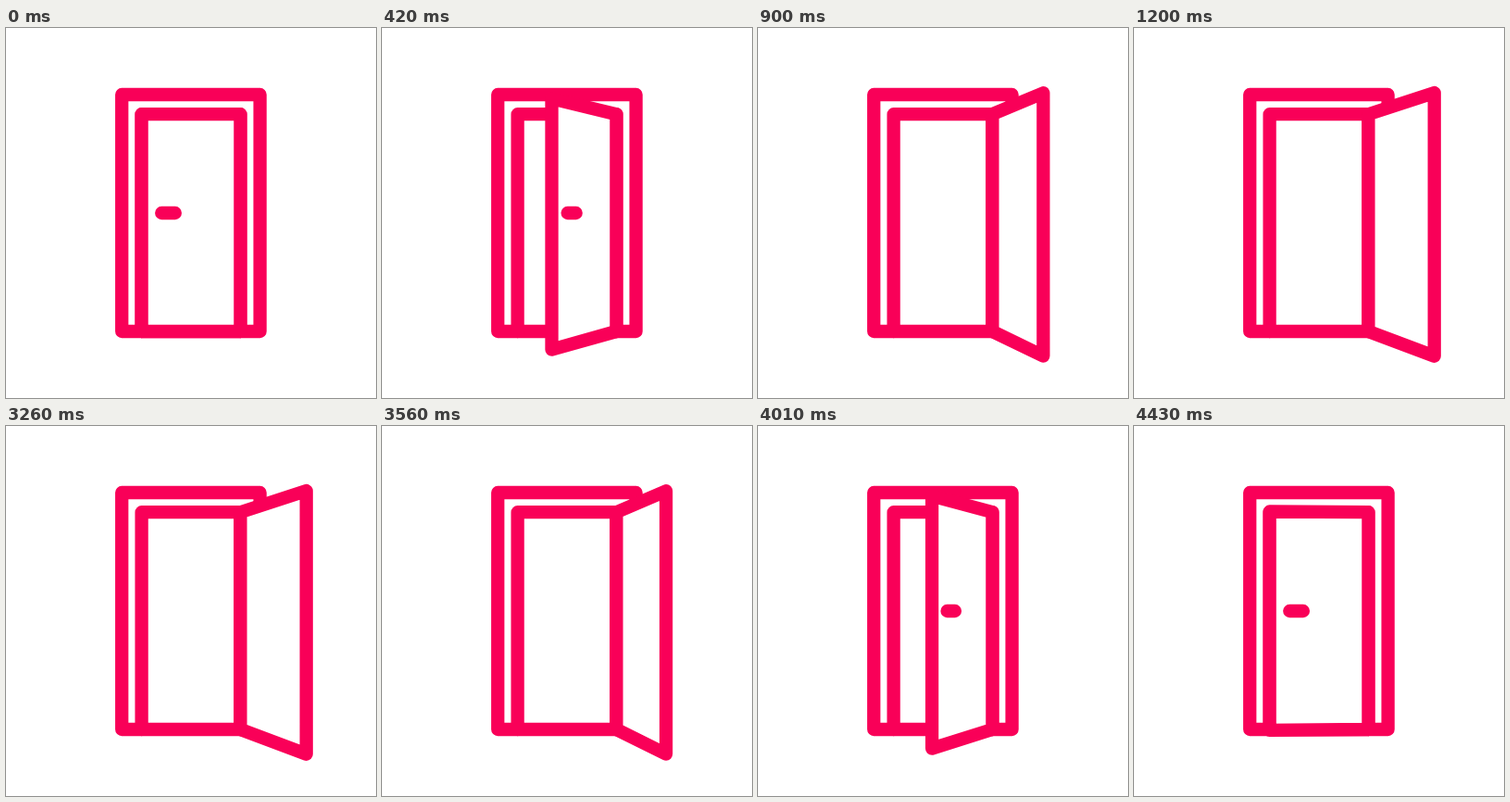
An HTML page that plays this animation: 400 by 400 pixels, repeating every 5460 ms.

```html
<!DOCTYPE html>
<html lang="en">
<head>
<meta charset="utf-8">
<title>Door</title>
<style>
  html, body { margin: 0; width: 100%; height: 100%; overflow: hidden; background: #fff; }
  svg { display: block; width: 100vw; height: 100vh; }
  .line { fill: none; stroke: #f90058; stroke-width: 14.3; stroke-linecap: round; stroke-linejoin: round; }
  #door { fill: #fff; }
</style>
</head>
<body>
<svg viewBox="0 0 400 400">
  <path class="line" d="M125.2 72H274.6V328H125.2Z"/>
  <path class="line" d="M146.6 328V93.2H253.4V328"/>
  <path class="line" id="door"/>
  <path class="line" id="knob"/>
</svg>
<script>
const LOOP = 5460, STEP = 30, SWING = 1200, CLOSE_AT = 3230;
const HINGE = 253.4, WIDTH = 106.8, TRAVEL = 178.1;
const TOP = 93.2, BOTTOM = 328;
const door = document.getElementById("door");
const knob = document.getElementById("knob");

const clamp = v => Math.min(1, Math.max(0, v));

// Symmetric cubic-bezier(a, 0, 1 - a, 1)
function ease(p) {
  const a = 0.555;
  let lo = 0, hi = 1;
  for (let i = 0; i < 30; i++) {
    const s = (lo + hi) / 2, r = 1 - s;
    const x = 3 * a * s * r * r + 3 * (1 - a) * s * s * r + s * s * s;
    if (x < p) lo = s; else hi = s;
  }
  return lo * lo * (3 - 2 * lo);
}

function openness(t) {
  return t < CLOSE_AT ? clamp(t / SWING) : clamp(1 - (t - CLOSE_AT) / SWING);
}

function draw(t) {
  const x = HINGE - WIDTH + TRAVEL * ease(openness(t));
  const u = clamp((HINGE - x) / WIDTH);
  const past = clamp((x - HINGE) / (TRAVEL - WIDTH));
  const lift = Math.sqrt(1 - u * u);
  const top = TOP - 22.2 * lift - past;
  const bottom = BOTTOM + 26 * lift + 0.8 * past;
  door.setAttribute("d", `M${HINGE} ${TOP}L${x} ${top}V${bottom}L${HINGE} ${BOTTOM}Z`);

  // The knob sits on the front side only
  const k = Math.pow(u, 1.13);
  knob.setAttribute("d", `M${HINGE - 85.2 * k} 200H${HINGE - 70.6 * k}`);
  knob.style.display = u > 0 ? "" : "none";
}

function tick() {
  const t = performance.now() % LOOP;
  draw(Math.floor(t / STEP) * STEP);
  requestAnimationFrame(tick);
}
tick();
</script>
</body>
</html>
```
